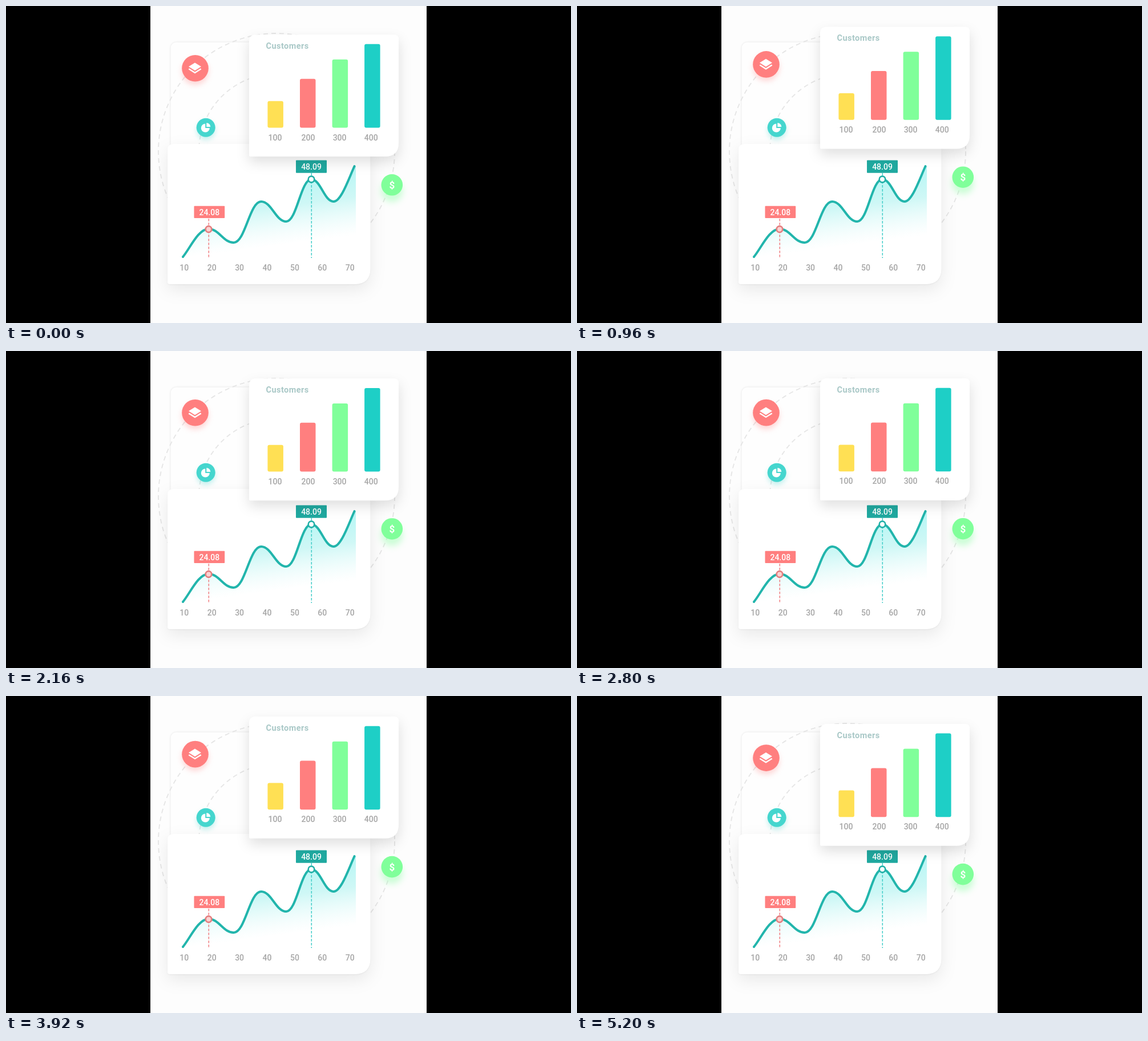
An HTML page for the animation above (5280 ms loop, 990 by 556 pixels).

```html
<!DOCTYPE html>
<html lang="en">
<head>
<meta charset="utf-8">
<title>Customers dashboard</title>
<style>
  html, body { margin: 0; width: 100%; height: 100%; overflow: hidden; background: #000; }
  svg { display: block; width: 990px; height: 556px; }
  text { font-family: Roboto, "Liberation Sans", sans-serif; font-weight: 500; font-size: 14px; text-anchor: middle; }
  .label { fill: #a6a6a6; }
  .tag { fill: #fff; }
  .title { fill: #a9c8c7; font-weight: 700; font-size: 14.5px; letter-spacing: .45px; text-anchor: start; }
  .dollar { fill: #fff; font-weight: 700; font-size: 17px; }
  .orbit { fill: none; stroke: #e5e5e5; stroke-width: 1.8; stroke-dasharray: 8 6; }
  .back { filter: drop-shadow(0 0 1.5px rgba(0,0,0,.12)); }
  .main { filter: drop-shadow(0 1px 1px rgba(0,0,0,.06)) drop-shadow(0 10px 14px rgba(0,0,0,.08)); }
  .front { filter: drop-shadow(0 10px 11px rgba(0,0,0,.12)); }
  .red { filter: drop-shadow(0 6px 5px rgba(255,127,127,.3)); }
  .teal { filter: drop-shadow(0 5px 4px rgba(67,213,205,.3)); }
  .green { filter: drop-shadow(0 11px 6px rgba(128,255,154,.4)); }
</style>
</head>
<body>
<svg viewBox="0 0 990 556">
  <defs>
    <linearGradient id="fade" gradientUnits="userSpaceOnUse" x1="596" y1="281" x2="612" y2="402">
      <stop offset="0" stop-color="#b3f6f4"/>
      <stop offset=".45" stop-color="#c6f6f4" stop-opacity=".85"/>
      <stop offset="1" stop-color="#e4fbfa" stop-opacity="0"/>
    </linearGradient>
    <clipPath id="panel"><rect x="253" width="484" height="556"/></clipPath>
  </defs>
  <rect width="990" height="556"/>
  <g clip-path="url(#panel)">
    <rect x="253" width="484" height="556" fill="#fdfdfd"/>
    <rect class="back" x="288.5" y="63.5" width="300" height="200" rx="10" fill="#fefefe"/>
    <circle class="orbit" cx="474" cy="255" r="207"/>
    <circle class="orbit" cx="474" cy="255" r="136"/>

    <path class="main" fill="#fff" d="M293 242H630Q638.500 242 638.500 251V460Q638.500 488 610.500 488H287Q283 488 283 484V252Q283 242 293 242Z"/>
    <path id="area" fill="url(#fade)"/>
    <g fill="none" stroke-width="1.5" stroke-dasharray="4.500 2.500">
      <path stroke="#f07f82" d="M355.300 373V442"/>
      <path stroke="#42cdc9" d="M535.300 293V442"/>
    </g>
    <path id="curve" fill="none" stroke="#22b5ac" stroke-width="4" stroke-linecap="round"/>
    <circle cx="355" cy="391.500" r="5.300" fill="#fbd3d3" stroke="#e57f80" stroke-width="2.700"/>
    <circle cx="535" cy="304" r="5.300" fill="#fff" stroke="#21b0a8" stroke-width="2.700"/>
    <rect x="329.500" y="350.800" width="53.700" height="21.300" rx="1" fill="#ff7f7f"/>
    <rect x="508" y="270.500" width="54" height="22.300" rx="1" fill="#20a9a0"/>
    <text class="tag" x="356.300" y="366.500">24.08</text>
    <text class="tag" x="535" y="286.600">48.09</text>
    <g id="axis"></g>

    <g id="stack">
      <circle class="red" cx="331.500" cy="102.200" r="23.300" fill="#ff7f7f"/>
      <path fill="#fff" d="M331 92.500L342 99.300L331 106.200L320 99.300Z"/>
      <path fill="none" stroke="#fff" stroke-width="2.400" d="M320.300 103.300L331 110L341.700 103.300"/>
    </g>
    <circle class="teal" cx="350.200" cy="213.200" r="16.500" fill="#45d6ce"/>
    <path fill="#fff" d="M349.200 206.600V214H356.800A7.500 7.500 0 1 1 349.200 206.600Z"/>
    <path fill="#fff" d="M351.300 205A7 7 0 0 1 358.300 212H351.300Z"/>
    <g id="coin">
      <circle class="green" cx="676.300" cy="299.800" r="18.800" fill="#80ff9a"/>
      <text class="dollar" x="676.300" y="306">$</text>
    </g>

    <g id="card">
      <path class="front" fill="#fff" d="M438 36.200H680Q688 36.200 688 44.200V226Q688 250 664 250H428Q426 250 426 248V48.200Q426 36.200 438 36.200Z"/>
      <text class="title" x="455.500" y="60.800">Customers</text>
    </g>
  </g>
</svg>
<script>
const LOOP = 5280, STEP = 80, HALF = 1240, LEAD = 10;
const $ = id => document.getElementById(id);

function add(parent, tag, attrs, text = '') {
  const el = document.createElementNS('http://www.w3.org/2000/svg', tag);
  for (const key in attrs) el.setAttribute(key, attrs[key]);
  el.textContent = text;
  parent.append(el);
}

const bars = [
  { x: 458.4, top: 152.7, mid: 471.5, color: '#ffe054' },
  { x: 515, top: 113.7, mid: 529.5, color: '#ff7f7f' },
  { x: 571.6, top: 79.8, mid: 584.6, color: '#80ff9a' },
  { x: 628.1, top: 52.8, mid: 639.8, color: '#1ecfc6' }
];
bars.forEach((b, i) => {
  add($('card'), 'rect', { x: b.x, y: b.top, width: 27.5, height: 199.4 - b.top, rx: 3, fill: b.color });
  add($('card'), 'text', { class: 'label', x: b.mid, y: 221.6 }, (i + 1) * 100);
});
for (let i = 0; i < 7; i++) {
  add($('axis'), 'text', { class: 'label', x: 312.3 + i * 48.4, y: 463.5 }, (i + 1) * 10);
}

// Turning points of the curve, joined with level tangents
const turns = [[355, 391], [399, 415], [447, 343], [491, 378], [535, 304], [574, 343]];
let line = 'M310 440C323 424 337 391 355 391';
turns.slice(1).forEach(([x, y], i) => {
  const [px, py] = turns[i], w = (x - px) * 0.42;
  line += `C${px + w} ${py} ${x - w} ${y} ${x} ${y}`;
});
line += 'C587 343 600 304 610.500 281';
$('curve').setAttribute('d', line);
$('area').setAttribute('d', line + 'L613 281V442H310Z');

const ease = p => p < 0.5 ? 2 * p * p : 1 - 2 * (1 - p) ** 2;

// Vertical drift: 14 at the lowest point, -1 at the highest
function drift(t) {
  const p = (t + LEAD) / HALF % 2;
  return 14 - 15 * ease(p < 1 ? p : 2 - p);
}

const shift = (id, y) => $(id).setAttribute('transform', `translate(0 ${y.toFixed(2)})`);

function draw(t) {
  const d = drift(Math.floor(t % LOOP / STEP) * STEP);
  shift('card', d);
  shift('coin', d);
  shift('stack', d / 2);
}

const start = performance.now();
function tick() {
  draw(performance.now() - start);
  requestAnimationFrame(tick);
}
tick();
</script>
</body>
</html>
```
